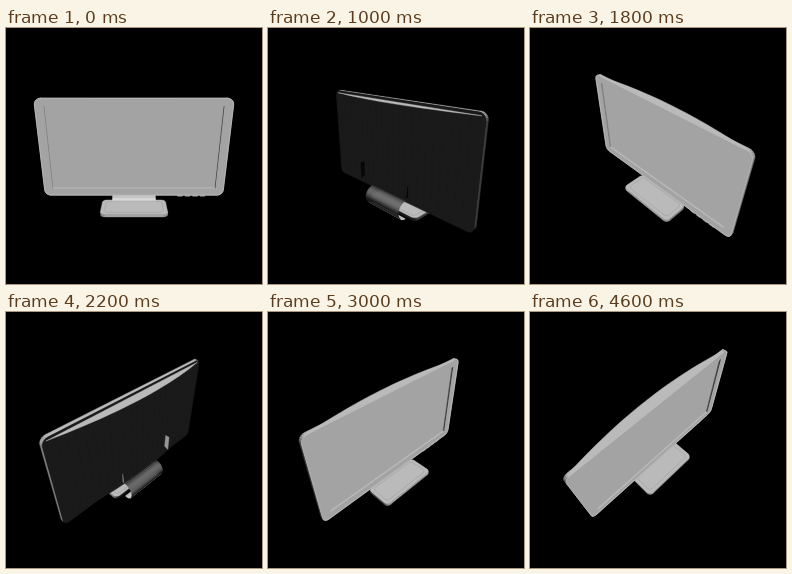
An HTML page with a canvas for the animation above (4800 ms loop, 256x256 px).

```html
<!DOCTYPE html>
<html>
<head>
<meta charset="utf-8">
<style>
  html, body { margin: 0; width: 100%; height: 100%; overflow: hidden; background: #000; }
  canvas { display: block; width: 256px; height: 256px; }
</style>
</head>
<body>
<canvas id="stage" width="256" height="256"></canvas>
<script>
const ctx = document.getElementById('stage').getContext('2d');
const DIST = 280, STEP = 200, TURN = 8, RAD = Math.PI / 180;
let view;

function setView(yaw, tilt) {
  const c = Math.cos(yaw), s = Math.sin(yaw), ce = Math.cos(tilt), se = Math.sin(tilt);
  view = { c, s, ce, se, eye: [DIST * ce * s, DIST * se, DIST * ce * c] };
}

function project([x, y, z]) {
  const { c, s, ce, se } = view;
  const across = x * c - z * s, toward = x * s + z * c;
  const k = DIST / (DIST - y * se - toward * ce);
  return [128 + across * k, 128 - (y * ce - toward * se) * k];
}

// Lights are fixed to the model: front, top and a weak one from the right.
function shade([x, y, z]) {
  let v = 26 + 137 * Math.max(0, z);
  v += y > 0 ? 160 * y : 90 * y;
  v += (x > 0 ? 100 : 35) * x ** 4;
  return Math.max(0, Math.min(214, v));
}

const gray = v => `rgb(${v | 0},${v | 0},${v | 0})`;
const dot = (a, b) => a[0] * b[0] + a[1] * b[1] + a[2] * b[2];
const sub = (a, b) => a.map((v, i) => v - b[i]);
const mean = pts => [0, 1, 2].map(i => pts.reduce((t, p) => t + p[i], 0) / pts.length);

function trace(pts) {
  ctx.beginPath();
  for (const p of pts) ctx.lineTo(...project(p));
  ctx.closePath();
}

function fill(pts, v) {
  trace(pts);
  ctx.fillStyle = ctx.strokeStyle = gray(v);
  ctx.lineWidth = 0.4;
  ctx.fill();
  ctx.stroke();
}

function outline(pts, v, width) {
  trace(pts);
  ctx.strokeStyle = gray(v);
  ctx.lineWidth = width;
  ctx.stroke();
}

function normal(pts) {
  const n = [0, 0, 0];
  pts.forEach((p, i) => {
    const q = pts[(i + 1) % pts.length];
    for (let k = 0; k < 3; k++) {
      const a = (k + 1) % 3, b = (k + 2) % 3;
      n[k] += (p[a] - q[a]) * (p[b] + q[b]);
    }
  });
  const len = Math.hypot(...n) || 1;
  return n.map(v => v / len);
}

function face(pts, core) {
  const mid = mean(pts);
  let n = normal(pts);
  if (dot(n, sub(mid, core)) < 0) n = n.map(v => -v);
  if (dot(n, sub(view.eye, mid)) > 0) fill(pts, shade(n));
}

// Convex prism: a flat shape swept from a to b.
function prism(shape, place, a, b) {
  const low = shape.map(p => place(p, a)), high = shape.map(p => place(p, b));
  const core = mean(low.concat(high));
  low.forEach((p, i) => {
    const j = (i + 1) % low.length;
    face([p, low[j], high[j], high[i]], core);
  });
  face(low, core);
  face(high, core);
}

function roundRect(x0, y0, x1, y1, r) {
  const pts = [];
  for (let i = 0; i < 4; i++) {
    const cx = i === 0 || i === 3 ? x1 - r : x0 + r;
    const cy = i < 2 ? y1 - r : y0 + r;
    for (let k = 0; k <= 5; k++) {
      const a = (i * 90 + k * 18) * RAD;
      pts.push([cx + r * Math.cos(a), cy + r * Math.sin(a)]);
    }
  }
  return pts;
}

const alongY = ([u, v], h) => [u, h, v];
const alongZ = ([u, v], h) => [u, v, h];

const panelShape = roundRect(-93.5, -44, 93.5, 57, 6);
const footShape = roundRect(-34, -8, 34, 21.3, 5);
const footInset = roundRect(-30, -5, 30, 17.5, 4);
const shellShape = Array.from({ length: 25 }, (_, i) => {
  const u = i / 12 - 1;
  return [90 * u, -3.5 - 8.5 * (1 - u * u)];
});

function drawFoot() {
  prism(footShape, alongY, -57, -54);
  outline(footInset.map(p => alongY(p, -54)), 166, 0.8);
}

// Open half pipe behind the foot: lit inside, dim outside.
function drawPipe() {
  const edge = (a, x) => [x, -47 + 10 * Math.cos(a), -11 - 10 * Math.sin(a)];
  const parts = [];
  for (let i = 0; i < 18; i++) {
    const a = i * 10 * RAD, b = a + 10 * RAD, m = (a + b) / 2;
    const n = [0, Math.cos(m), -Math.sin(m)];
    const outside = dot(n, sub(view.eye, edge(m, 0))) > 0;
    const v = outside ? 42 + 66 * Math.max(-0.2, Math.sin(2 * m)) : shade(n.map(c => -c));
    parts.push({ outside, v, pts: [edge(a, -24), edge(b, -24), edge(b, 24), edge(a, 24)] });
  }
  parts.sort((p, q) => p.outside - q.outside);
  if (view.eye[2] > 1) parts.reverse();
  for (const p of parts) fill(p.pts, p.v);
}

const drawShell = () => prism(shellShape, alongY, -36, 54.5);

// Upright edges on the back: two recess walls and the sides of the neck.
function drawBackEdges() {
  for (const side of [-1, 1]) {
    const x = 45 * side, k = 27 * side;
    if (view.eye[0] * side < 45) {
      fill([[x, -17, -9.9], [x, -17, -5], [x, -33, -5], [x, -35, -9.9]], side < 0 ? 150 : 8);
    }
    if (view.eye[0] * side > 27) {
      fill([[k, -20, -11.3], [k, -32, -11.3], [k, -32, -13]], side > 0 ? 130 : 4);
    }
  }
}

function drawScreen() {
  const L = -85, R = 85, B = -36, T = 50, deep = -1.5;
  const hole = [[L, B], [R, B], [R, T], [L, T]];
  const inward = [[0, 1, 0], [-1, 0, 0], [0, -1, 0], [1, 0, 0]];
  ctx.save();
  trace(hole.map(p => alongZ(p, 0)));
  ctx.clip();
  hole.forEach((p, i) => {
    const q = hole[(i + 1) % 4], n = inward[i];
    if (dot(n, sub(view.eye, alongZ(p, 0))) <= 0) return;
    fill([alongZ(p, 0), alongZ(q, 0), alongZ(q, deep), alongZ(p, deep)], shade(n));
  });
  ctx.restore();
}

function drawButtons() {
  for (let i = 0; i < 4; i++) {
    const x = 46 + i * 8;
    fill([[x, -43, -0.5], [x + 5, -43, -0.5], [x + 5, -45.6, -0.5], [x, -45.6, -0.5]], 165);
  }
}

const drawPanel = () => prism(panelShape, alongZ, -3.5, 0);

function draw(index) {
  setView((index % TURN) * 45 * RAD, (20 + 20 * Math.floor(index / TURN)) * RAD);
  ctx.fillStyle = '#000';
  ctx.fillRect(0, 0, 256, 256);
  ctx.lineJoin = 'round';
  if (view.eye[2] > 1) {
    drawFoot();
    drawPipe();
    drawShell();
    drawButtons();
    drawPanel();
    outline(panelShape.map(p => alongZ(p, -0.3)), 186, 0.9);
    drawScreen();
  } else {
    drawFoot();
    drawPanel();
    drawShell();
    drawBackEdges();
    drawPipe();
  }
}

const start = performance.now();
function tick() {
  const t = Math.max(0, performance.now() - start);
  draw(Math.floor(t / STEP) % (TURN * 3));
  requestAnimationFrame(tick);
}
draw(0);
requestAnimationFrame(tick);
</script>
</body>
</html>
```
